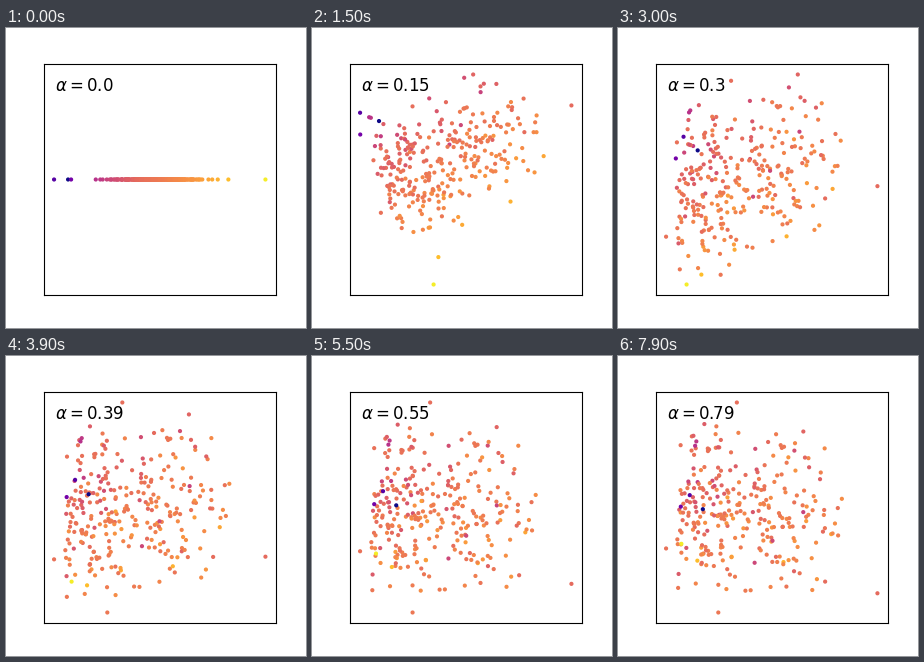
A matplotlib script that plays this animation: 300x300 px, repeating every 8000 ms.

```python
import numpy as np
import matplotlib.pyplot as plt
from matplotlib.animation import FuncAnimation

FRAMES, INTERVAL, COUNT = 80, 100, 285
rng = np.random.default_rng(5)

# Outlying samples: x, y in the final layout and regression score
OUTLIERS = np.array([
    (259, 240, 130), (119, 46, 135), (48, 191, 140), (100, 256, 148),
    (85, 154, 62), (72, 140, 48), (63, 151, 65),
    (63, 184, 259), (79, 202, 222),
])


def cloud(n):
    """Samples dense at the left and thinning out to the right."""
    x = 58 + 184 * rng.beta(1.25, 2.3, n)
    y = 153 + .12 * (x - 125) + rng.normal(0, 43, n)
    # fold stray samples back inside
    y = np.where((y < 66) | (y > 248), rng.uniform(85, 230, n), y)
    score = 149 + .15 * (x - 125) + .13 * (y - 153) + rng.normal(0, 20, n)
    return np.column_stack([x, y, np.clip(score, 78, 221)])


samples = np.vstack([cloud(COUNT), OUTLIERS])
latent = (samples - [155, 151, 150]).T
tone = np.interp(samples[:, 2], [48, 62, 66, 100, 130, 190, 259],
                 [.15, 0, .3, .48, .62, .76, .97])


def falloff(alpha, middle, power):
    return 1 / (1 + (alpha / middle) ** power)


def unit(v):
    """Scale to 0..1; constant data goes to the centre."""
    span = np.ptp(v)
    return (v - v.min()) / span if span else np.full(len(v), .5)


def layout(alpha):
    # the score leaves the first axis early, the second one later
    a = falloff(alpha, .11, 3)
    b = falloff(alpha, .31, 4)
    x = np.array([1 - a, .8 * a * (1 - a), a]) @ latent
    y = np.array([-.78 * b, 1 - .5 * b * b, .95 * b]) @ latent
    return np.column_stack([unit(x), unit(y * (alpha > 0))])


fig, ax = plt.subplots(figsize=(3, 3), dpi=100)
fig.subplots_adjust(left=.125, right=.9, bottom=.11, top=.88)
ax.set(xlim=(-.05, 1.05), ylim=(1.05, -.05), xticks=[], yticks=[])
dots = ax.scatter(*layout(0).T, s=4, c=tone, cmap="plasma", vmin=0, vmax=1)
label = ax.text(.05, .885, "", transform=ax.transAxes, fontsize=12, zorder=5)


def update(i):
    alpha = round(i / 100, 2)
    dots.set_offsets(layout(alpha))
    label.set_text(rf"$\alpha = {alpha}$")
    return dots, label


anim = FuncAnimation(fig, update, frames=FRAMES, interval=INTERVAL,
                     repeat=True, repeat_delay=0)
plt.show()
```
